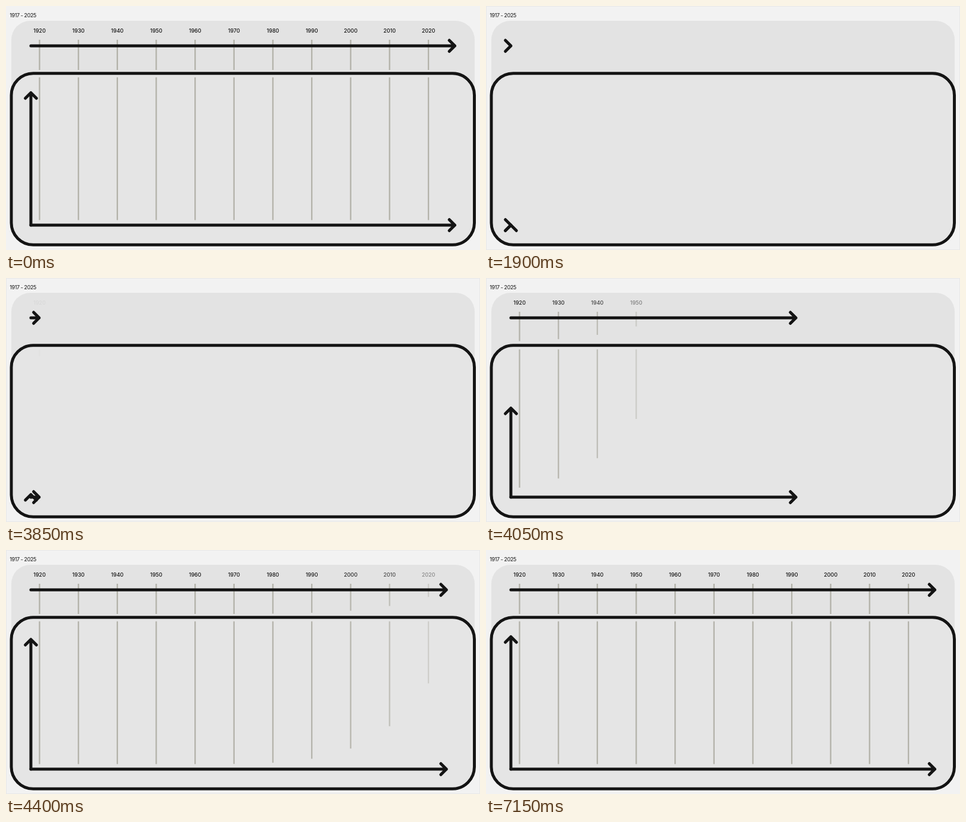
Animation, 800 px wide and 412 px high, one loop 7200 ms. Source, as an HTML page:

```html
<!DOCTYPE html>
<html lang="en">
<head>
<meta charset="utf-8">
<title>Timeline</title>
<style>
  html, body { margin: 0; height: 100%; overflow: hidden; background: #f2f2f2; }
  svg { display: block; width: 100vw; height: 100vh; }
  text { font: 500 9px Inter, Roboto, sans-serif; fill: #141414; text-anchor: middle; }
  .title { font-weight: 400; letter-spacing: -.4px; text-anchor: start; }
  .ink { fill: none; stroke: #141414; stroke-width: 5; stroke-linecap: round; stroke-linejoin: round; }
  .grid { fill: none; stroke: #b3b2a9; stroke-width: 2.3; }
</style>
</head>
<body>
<svg viewBox="0 0 800 412">
  <rect width="800" height="412" fill="#f2f2f2"/>
  <rect id="edge" x=".5" y=".5" width="799" height="411" fill="none" stroke="#e8e8e8"/>
  <rect x="9" y="25" width="782" height="250" rx="32" fill="#e3e3e3"/>
  <rect class="ink" x="9" y="113.7" width="781.5" height="289.6" rx="37" style="fill:#e5e5e5"/>
  <text class="title" x="6.2" y="18.8">1917 - 2025</text>
  <g id="decades"></g>
  <path class="ink" id="top"/>
  <path class="ink" id="up"/>
  <path class="ink" id="base"/>
</svg>
<script>
const LOOP = 7200, RESET = 1900, START = 3846;
const DRAW = 1020, FADE = 408, STAGGER = 51;
const byId = id => document.getElementById(id);
const svgNode = (name, parent, attrs) => {
  const node = document.createElementNS('http://www.w3.org/2000/svg', name);
  for (const key in attrs) node.setAttribute(key, attrs[key]);
  return parent.appendChild(node);
};
const easeOut = u => 1 - (1 - Math.min(1, Math.max(0, u))) ** 5;

const decades = Array.from({ length: 11 }, (_, i) => {
  const x = 56.6 + 65.64 * i;
  const group = svgNode('g', byId('decades'), {});
  const line = svgNode('path', group, { class: 'grid' });
  svgNode('text', group, { x, y: 45.3 }).textContent = 1920 + 10 * i;
  return { x, group, line };
});

const rightArrow = (y, p) => {
  const x = 42 + 715.5 * p;
  return `M42 ${y}H${x}m-9.3-9.3l9.3 9.3l-9.3 9.3`;
};
const upArrow = p => `M42 370V${370 - 223.5 * p}m-9.3 9.3l9.3-9.3l9.3 9.3`;

function render(t) {
  // Before the reset everything is fully drawn.
  const since = t < RESET ? Infinity : t - START;
  const p = easeOut(since / DRAW);
  byId('top').setAttribute('d', rightArrow(67.2, p));
  byId('base').setAttribute('d', rightArrow(370, p));
  byId('up').setAttribute('d', upArrow(p));
  decades.forEach(({ x, group, line }, i) => {
    const q = easeOut((since - i * STAGGER) / FADE);
    group.setAttribute('opacity', q);
    line.setAttribute('d', `M${x} 57v${51 * q}M${x} 120.5v${241 * q}`);
  });
  byId('edge').setAttribute('opacity', t >= 1000 && t < 7150 ? 1 : 0);
}

let origin;
function tick(now) {
  origin ??= now;
  // The motion runs at 20 frames a second.
  render(Math.floor((now - origin) % LOOP / 50) * 50);
  requestAnimationFrame(tick);
}
render(0);
requestAnimationFrame(tick);
</script>
</body>
</html>
```
